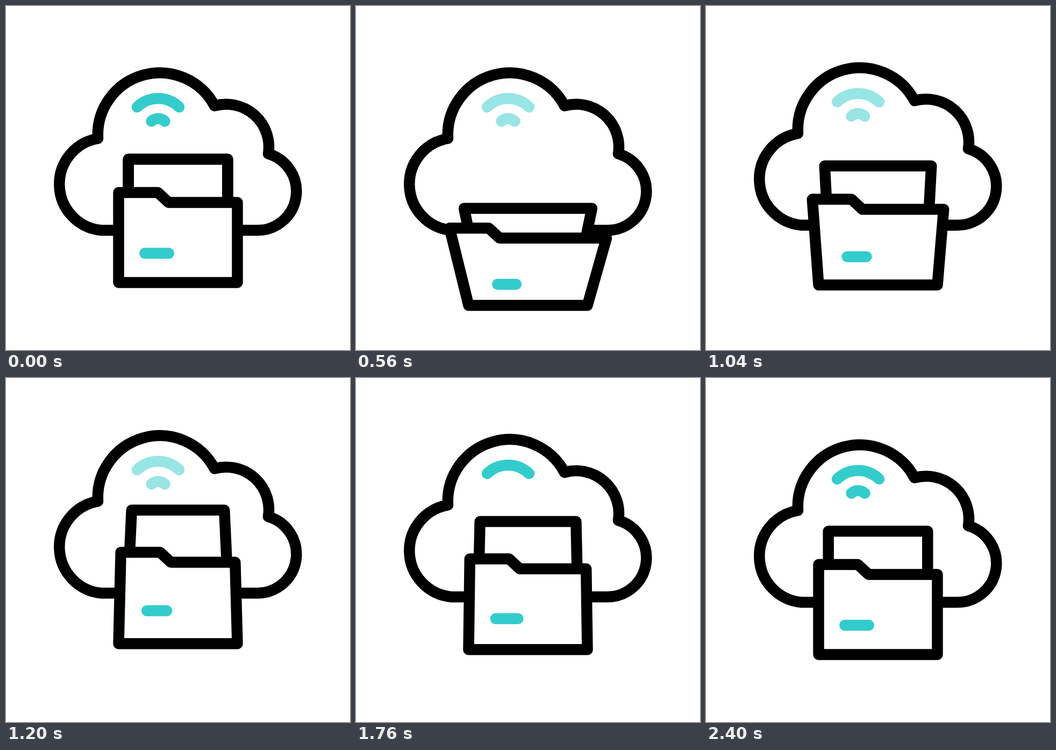
Animation, 640 px wide and 640 px high, one loop 2.84 s. Source, as an HTML page:

```html
<!DOCTYPE html>
<html lang="en">
<head>
<meta charset="utf-8">
<title>Cloud folder</title>
<style>
  html, body { margin: 0; height: 100%; overflow: hidden; background: #fff; }
  svg { display: block; width: 100vw; height: 100vh; }
  path { fill: none; stroke: #000; stroke-width: 20.5; stroke-linejoin: round; }
  .accent { stroke: #3cc; stroke-linecap: round; }
  .solid { fill: #fff; }
</style>
</head>
<body>
<svg viewBox="0 0 640 640">
  <g id="cloud">
    <path d="M209 417.3H177.5A86.2 86.2 0 0 1 171 246.5A115.3 115.3 0 0 1 388 185.7A79.5 79.5 0 0 1 488 275A72.6 72.6 0 0 1 468 417.3H430"/>
    <path id="bigWave" class="accent" d="M244 188A55.8 55.8 0 0 1 322 188"/>
    <path id="smallWave" class="accent" d="M270.5 214.5A18 18 0 0 1 295.5 214.5"/>
  </g>
  <path id="sheet" class="solid"/>
  <path id="slidingSheet" d="M227.7 365V285H412.3V365"/>
  <path id="folder" class="solid"/>
  <path id="dash" class="accent"/>
</svg>
<script>
const LOOP = 2840, STEP = 40, LAST = 2400, SQUASHED = 680;

// Offsets from the resting pose at the two extremes
const SQUASH = { bottom: 45.5, tab: 71, spread: 38, sheet: 98, sheetSpread: 28.5, dash: 62, inset: 5.3 };
const STRETCH = { bottom: -22.5, tab: -26, spread: -5.6, sheet: -44, sheetSpread: -7.2, dash: -30, inset: 3.7 };

const $ = id => document.getElementById(id);
const draw = (id, d) => $(id).setAttribute('d', d);
const move = (id, y) => $(id).setAttribute('transform', `translate(0 ${y})`);

function render(t) {
  // Eased 0 to 1 between two times; a power below 1 gives a quicker start
  const ease = (from, to, power = 1) => {
    const s = Math.min(1, Math.max(0, (t - from) / (to - from))) ** power;
    return s * s * (3 - 2 * s);
  };

  const sink = ease(0, SQUASHED, .886), rebound = ease(758, 1254), settle = ease(1580, 1900);
  const squash = sink - rebound, stretch = rebound - settle;
  const pose = key => SQUASH[key] * squash + STRETCH[key] * stretch;

  const bottom = 514.5 + pose('bottom');
  const tab = 347 + pose('tab'), lip = tab + 18.6, spread = pose('spread');
  const sheetTop = 285 + pose('sheet'), sheetBase = sheetTop + 130, sheetSpread = pose('sheetSpread');
  const dash = 460 + pose('dash'), inset = pose('inset');

  draw('sheet', `M227.7 ${sheetBase}L${227.7 - sheetSpread} ${sheetTop}`
    + `H${412.3 + sheetSpread}L412.3 ${sheetBase}`);
  draw('folder', `M209.5 ${bottom}L${209.5 - spread} ${tab}H${282.5 - spread}`
    + `L${302.5 - spread} ${lip}H${430.5 + spread}L430.5 ${bottom}Z`);
  draw('dash', `M${258.3 + inset} ${dash}H${302.8 - inset}`);

  move('slidingSheet', 172 * sink);
  $('slidingSheet').style.display = t < SQUASHED ? '' : 'none';
  move('cloud', -19.3 * (ease(771, 1316) - ease(1600, 1930)));

  const dim = ease(400, 520) / 2, split = ease(1240, 1400) / 2, swap = ease(1880, 2040);
  $('bigWave').style.opacity = 1 - ease(0, 160) + dim + split - swap + ease(2240, 2400);
  $('smallWave').style.opacity = 1 - dim - split + swap;
}

function tick() {
  const t = performance.now() % LOOP;
  render(Math.min(LAST, Math.floor(t / STEP) * STEP));
  requestAnimationFrame(tick);
}
tick();
</script>
</body>
</html>
```
